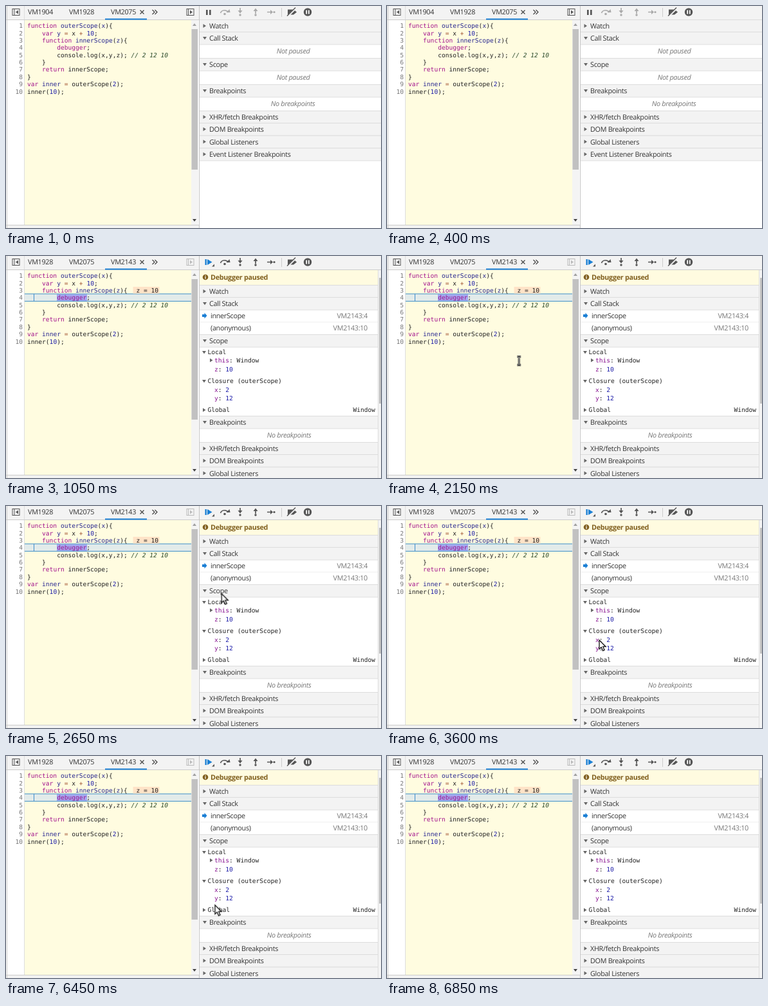
An HTML page that plays this animation: 583 by 346 pixels, repeating every 8 s.

```html
<!DOCTYPE html>
<html lang="en">
<head>
<meta charset="utf-8">
<title>Closure in the debugger</title>
<style>
html, body { margin: 0; width: 583px; height: 346px; overflow: hidden; background: #fff; }
svg { display: block; }
text { font: 10.8px "Open Sans", "Noto Sans", sans-serif; letter-spacing: -.3px; fill: #333; white-space: pre; text-rendering: geometricPrecision; }
.mono { font: 9.59px "DejaVu Sans Mono", monospace; letter-spacing: 0; fill: #222; }
.num { fill: #777; text-anchor: end; }
.end { text-anchor: end; }
.note { font-style: italic; fill: #777; text-anchor: middle; }
.dim { fill: #777; }
.bold { font-weight: 700; fill: #80601f; }
.k { fill: #a3138b; }
.d { fill: #26268f; }
.n { fill: #1c1ca8; }
.o { fill: #a0522d; }
.c { fill: #2c4c2c; font-style: italic; }
.p { fill: #881391; }
.idle, .paused, .arrow, .beam { animation: 8s step-end infinite; }
.idle { animation-name: idle; }
.paused { animation-name: paused; }
.arrow { animation-name: arrow; }
.beam { animation-name: beam; }
.cursor { animation: move 8s linear infinite; }
@keyframes idle { 0% { visibility: visible } 12.5%, 100% { visibility: hidden } }
@keyframes paused { 0% { visibility: hidden } 12.5%, 100% { visibility: visible } }
@keyframes arrow {
  0% { visibility: hidden } 17.5% { visibility: visible } 19% { visibility: hidden }
  31% { visibility: visible } 81.5%, 100% { visibility: hidden }
}
@keyframes beam {
  0% { visibility: hidden } 19% { visibility: visible } 31% { visibility: hidden }
  81.5% { visibility: visible } 85.55%, 100% { visibility: hidden }
}
@keyframes move {
  0%, 17.5% { transform: translate(450px, 264px) }
  21% { transform: translate(84px, 66px) }
  23.125%, 26.875% { transform: translate(205px, 163px) }
  29% { transform: translate(240px, 236px) }
  31.5% { transform: translate(318px, 212px) }
  33.5% { transform: translate(339px, 120px) }
  35.625%, 42.2% { transform: translate(322px, 95px) }
  43.6% { transform: translate(339px, 160px) }
  45%, 50.2% { transform: translate(330px, 209px) }
  53.125%, 65.55% { transform: translate(338px, 195px) }
  65.62% { transform: translate(327px, 207px) }
  68.125%, 72.9% { transform: translate(326px, 207px) }
  75.625%, 80.3% { transform: translate(347px, 244px) }
  85.6%, 100% { transform: translate(0, 60px) }
}
</style>
</head>
<body>
<svg id="stage" width="583" height="346" viewBox="0 0 583 346"></svg>
<script>
const rect = (x, y, w, h, fill, extra = '') =>
  `<rect x="${x}" y="${y}" width="${w}" height="${h}" fill="${fill}" ${extra}/>`;
const text = (x, y, s, cls = '') => `<text x="${x}" y="${y}" class="${cls}">${s}</text>`;
const path = (d, fill, extra = '') => `<path d="${d}" fill="${fill}" ${extra}/>`;
const line = (d, stroke, w = 1) => path(d, 'none', `stroke="${stroke}" stroke-width="${w}"`);
const group = (cls, ...parts) => `<g class="${cls}">${parts.join('')}</g>`;
// Wraps tokens written as {class:text} in coloured spans.
const paint = s => s.replace(/\{(\w):([^}]+)\}/g, '<tspan class="$1">$2</tspan>');
const mono = (x, y, s, cls = '') => text(x, y, paint(s), 'mono ' + cls);

const twisty = (x, y, open) => open
  ? path(`M${x - .5} ${y - 2}h6l-3 4.5z`, '#666')
  : path(`M${x} ${y - 3}v6l4.5 -3z`, '#666');

const section = (y, name, open, right) =>
  rect(301, y - 10, right - 301, 19.5, '#f3f3f3') +
  rect(301, y - 10, right - 301, 1, '#dcdcdc') +
  rect(301, y + 9.5, right - 301, 1, '#dcdcdc') +
  twisty(306.5, y, open) + text(316, y + 4, name);

const code = [
  '{k:function} {d:outerScope}({d:x}){',
  '    {k:var} {d:y} {o:=} x {o:+} {n:10};',
  '    {k:function} {d:innerScope}({d:z}){',
  '        {k:debugger};',
  '        console.log(x,y,z); {c:// 2 12 10}',
  '    }',
  '    {k:return} innerScope;',
  '}',
  '{k:var} {d:inner} {o:=} outerScope({n:2});',
  'inner({n:10});'
];
const rowY = i => 34.3 + 11.36 * i;

const panes = [
  rect(0, 0, 583, 346, '#fff'),
  rect(0, 0, 583, 21, '#f3f3f3'),
  rect(2, 22, 26, 320, '#fff'),
  rect(29, 22, 259, 320, '#fffce0'),
  rect(28, 22, 1, 320, '#ddd'),
  rect(288, 22, 11, 320, '#f4f4f4'),
  rect(288.5, 36, 9.5, 219, '#c1c1c1'),
  path('M290 31h6l-3 -4z', '#a0a0a0'),
  path('M290 332h6l-3 4z', '#444'),
  rect(0, 342, 300, 4, '#f3f3f3'),
  rect(0, 341, 300, 1, '#ccc'),
  rect(0, 21, 583, 1, '#ccc'),
  rect(1, 0, 1, 346, '#ccc'),
  rect(300, 0, 1, 346, '#c4c4c4')
].join('');

const navIcon = (x, dir, color) =>
  rect(x - 5.5, 4.5, 11, 10, 'none', `stroke="${color}"`) +
  line(`M${x - 3 * dir} 5v9`, color) +
  path(`M${x + 3.5 * dir} 9.5l${-4 * dir} -3v6z`, color);

const tabs = (...names) => names.map((s, i) => text([34, 98, 163][i], 13.3, s)).join('');

const tabBar = [
  rect(28, 0, 1, 21, '#ddd'),
  rect(154, 19.5, 65, 2, '#1a7fd4'),
  line('M208.5 6.5l6 6m0 -6l-6 6', '#444', 1.2),
  line('M227.5 6l3.5 3.5l-3.5 3.5M231.5 6l3.5 3.5l-3.5 3.5', '#444', 1.2),
  rect(10, 4.5, 11, 10, 'none', 'stroke="#555"'),
  line('M13 5v9', '#555'),
  path('M15 9.5l4 -3v6z', '#555')
].join('');

const steps = c => [
  line('M333.5 11a6.5 6 0 0 1 12 -1', c, 1.6),
  path('M342.5 10h6l-1 -5z', c),
  `<circle cx="340" cy="12.5" r="1.8" fill="${c}"/>`,
  line('M364 3v6M388 7v5M406 9.5h8', c, 1.7),
  path('M360.5 7h7l-3.5 4.5zM384.5 8h7l-3.5 -4.5zM411 6v7l4 -3.5z', c),
  `<circle cx="364" cy="14" r="1.7" fill="${c}"/>`,
  `<circle cx="388" cy="14" r="1.7" fill="${c}"/>`,
  `<circle cx="417" cy="9.5" r="1.6" fill="${c}"/>`
].join('');

const tools = [
  rect(428, 3, 1, 14, '#ccc'),
  path('M438 5.5h9l5 4l-5 4h-9z', '#555'),
  line('M438 16l13 -13', '#f3f3f3', 3),
  line('M437 15.5l13 -13', '#555', 1.4),
  '<circle cx="469" cy="9.5" r="6.2" fill="#555"/>',
  rect(466.3, 6.5, 1.8, 6, '#fff'), rect(469.9, 6.5, 1.8, 6, '#fff')
].join('');

const idle = group('idle',
  tabs('VM1904', 'VM1928', 'VM2075'),
  navIcon(286.5, 1, '#555'),
  rect(311, 6, 2.6, 8, '#555'), rect(316, 6, 2.6, 8, '#555'),
  steps('#aaa'),
  [['Watch', 31], ['Call Stack', 50, 1], ['Scope', 91, 1], ['Breakpoints', 132, 1],
   ['XHR/fetch Breakpoints', 173], ['DOM Breakpoints', 192], ['Global Listeners', 211.5],
   ['Event Listener Breakpoints', 231]].map(([s, y, open]) => section(y, s, open, 583)).join(''),
  text(446.5, 74, 'Not paused', 'note'),
  text(446.5, 115, 'Not paused', 'note'),
  text(446, 156, 'No breakpoints', 'note'));

const execLine = group('paused',
  rect(29, 59, 259, 11.5, '#e2ebea'),
  rect(79, 59.5, 47, 11, '#a3a8f0'),
  rect(29, 58.5, 259, 1, '#3f8fc9'), rect(29, 70, 259, 1, '#3f8fc9'),
  rect(43, 59, 1, 11, '#3f8fc9'),
  rect(197.5, 48, 41, 10.5, '#ffe3c7'),
  mono(202.5, rowY(2), 'z = 10'));

const paused = group('paused',
  tabs('VM1928', 'VM2075', 'VM2143'),
  navIcon(286.5, 1, '#bbb'),
  rect(309.5, 5, 2.4, 9, '#1a7fd4'),
  path('M313 5v9l7.5 -4.5z', '#1a7fd4'),
  path('M320 16.5h4v-4z', '#555'),
  steps('#555'),
  rect(301, 22, 277, 23, '#fffbe0'),
  '<circle cx="310" cy="33" r="4.3" fill="#80601f"/>',
  rect(309.4, 32.3, 1.3, 3.4, '#fff'), rect(309.4, 30.2, 1.3, 1.3, '#fff'),
  text(318, 36.8, 'Debugger paused', 'bold'),
  [['Watch', 55], ['Call Stack', 74, 1], ['Scope', 132, 1], ['Breakpoints', 259, 1],
   ['XHR/fetch Breakpoints', 300], ['DOM Breakpoints', 319], ['Global Listeners', 338.5]]
    .map(([s, y, open]) => section(y, s, open, 578)).join(''),
  path('M305 91h3.5v-2.5l4 4.5l-4 4.5v-2.5h-3.5z', '#1a7fd4'),
  text(318, 97, 'innerScope'), text(562, 97, 'VM2143:4', 'end dim'),
  rect(301, 102.5, 277, 1, '#efefef'),
  text(318, 116, '(anonymous)'), text(562, 116, 'VM2143:10', 'end dim'),
  twisty(305.5, 150, true), mono(313.5, 153.3, 'Local'),
  twisty(317, 162.5, false), mono(324, 166.3, '{p:this}: Window'),
  mono(324, 180.3, '{p:z}: {n:10}'),
  twisty(305.5, 195, true), mono(313.5, 198.3, 'Closure (outerScope)'),
  mono(324, 211.6, '{p:x}: {n:2}'),
  mono(324, 225.4, '{p:y}: {n:12}'),
  twisty(306, 240, false), mono(313.5, 243.3, 'Global'), mono(574, 243.3, 'Window', 'end'),
  text(440, 283, 'No breakpoints', 'note'),
  rect(578, 22, 5, 324, '#f4f4f4'), rect(578, 22, 1, 324, '#ddd'),
  rect(580, 34, 3, 196, '#c1c1c1'));

const editor = code.map((s, i) =>
  text(26, rowY(i), i + 1, 'mono num') + mono(33, rowY(i), s)).join('');

const beam = 'M-3 -6.5h2l1 1l1 -1h2M0 -5.5v11M-3 6.5h2l1 -1l1 1h2';
const cursor = group('cursor',
  group('arrow', path('M0 0v14l3.2 -3l2.4 5.6l2.5 -1.1l-2.4 -5.3h4.4z', '#fff',
    'stroke="#111" stroke-width="1.3"')),
  group('beam', line(beam, '#111', 2.8), line(beam, '#fff', .8)));

document.getElementById('stage').innerHTML =
  panes + tabBar + tools + execLine + editor + idle + paused + cursor;
</script>
</body>
</html>
```
